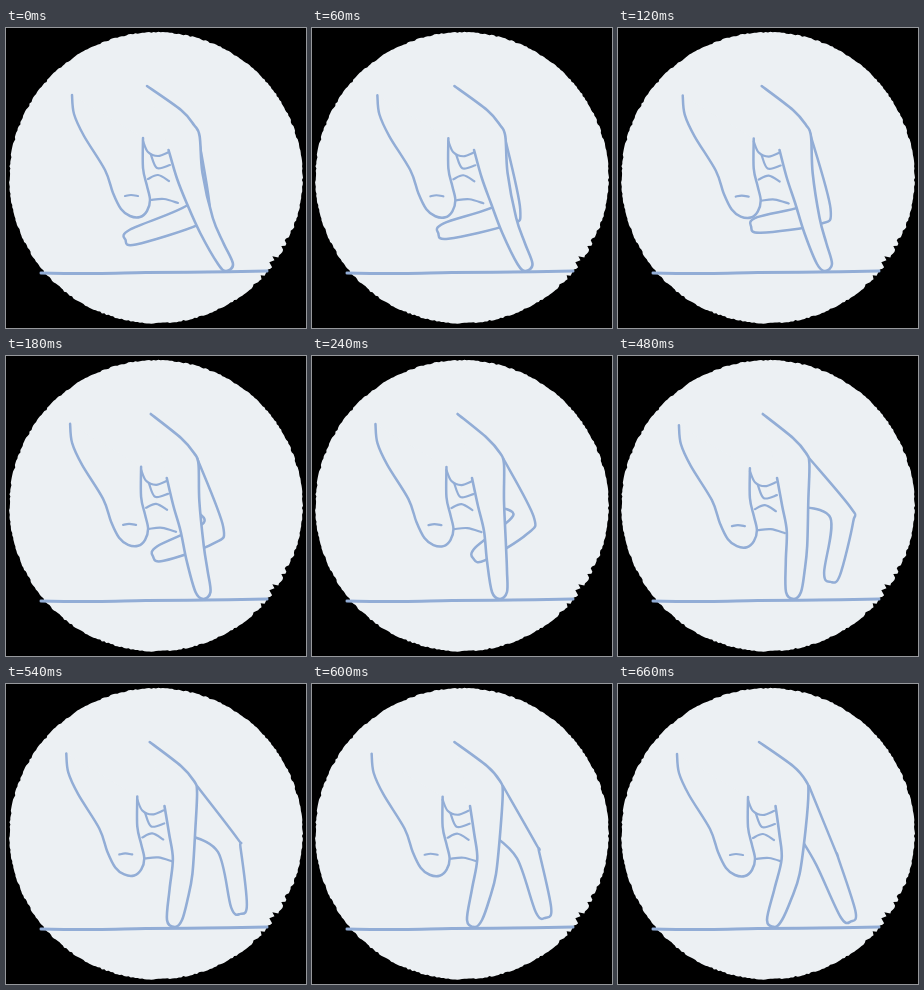
These frames come from a looping animation (300x300 px, 720 ms). An HTML page with a canvas:

```html
<!DOCTYPE html>
<html>
<head>
<meta charset="utf-8">
<style>
  html, body { margin: 0; width: 100%; height: 100%; overflow: hidden; background: #000; }
  canvas { display: block; }
</style>
</head>
<body>
<canvas id="stage" width="300" height="300"></canvas>
<script>
const ctx = document.getElementById('stage').getContext('2d');
const STEP = 60, STEPS = 12, PAPER = '#ecf0f3', INK = '#92add6';

// The thumb side and palm folds keep their shape and drift as a whole.
const thumb = [[66, 67], [68, 86], [78, 108], [99, 142], [107, 165], [115, 181], [124, 188],
  [134, 189], [141, 183], [144, 172], [141, 158], [137, 140], [137, 110]];
const folds = [
  [[137, 113], [142, 124], [152, 128], [163, 124]],
  [[145, 127], [151, 140], [164, 137]],
  [[142, 151], [152, 147], [163, 153]],
  [[145, 172], [158, 171], [172, 175]],
  [[119, 168], [125, 167], [132, 168]]
];

// Planted finger: x, y and how far each point follows the tip.
const planted = [[175, 82, 0], [188, 97, 0], [192, 108, 0.05], [192, 145, 0.14], [194, 190, 0.4], [195, 215, 0.7],
  [195, 236, 1], [188, 243, 1], [180, 236, 1], [175, 205, 0.6], [172, 175, 0.27], [166, 150, 0.15], [160, 122, 0.08]];

// Key positions of the moving joints: step, planted tip x, then knee and tip of the swinging finger.
const joints = [
  [0, 220, 192, 184, 127, 209],
  [2, 207, 201, 184, 141, 197],
  [4, 188, 211, 166, 168, 198],
  [6, 181, 221, 158, 205, 195],
  [8, 176, 224, 160, 214, 218],
  [9, 169, 222, 162, 233, 222],
  [11, 157, 207, 173, 230, 230]
];

function jointsAt(step) {
  const i = Math.max(1, joints.findIndex(j => j[0] >= step));
  const a = joints[i - 1], b = joints[i], k = (step - a[0]) / (b[0] - a[0]);
  return a.map((v, n) => v + (b[n] - v) * k).slice(1);
}

// Smooth curve through all points, optionally covering what lies behind it.
function curve(p, width, cover) {
  ctx.beginPath();
  ctx.moveTo(...p[0]);
  for (let i = 0; i < p.length - 1; i++) {
    const a = p[i - 1] || p[i], b = p[i], c = p[i + 1], d = p[i + 2] || c;
    ctx.bezierCurveTo(b[0] + (c[0] - a[0]) / 6, b[1] + (c[1] - a[1]) / 6,
      c[0] - (d[0] - b[0]) / 6, c[1] - (d[1] - b[1]) / 6, ...c);
  }
  if (cover) ctx.fill();
  ctx.lineWidth = width;
  ctx.stroke();
}

// Point at a joint, moved along and to the outside of the bone from a to b.
function beside(joint, a, b, along, out) {
  const dx = b[0] - a[0], dy = b[1] - a[1], len = Math.hypot(dx, dy);
  return [joint[0] + (dx * along + dy * out) / len, joint[1] + (dy * along - dx * out) / len];
}

function swingingFinger(knee, tip) {
  const root = [180, 108];
  const shin = (joint, along, out) => beside(joint, knee, tip, along, out);
  curve([[191, 102], beside(knee, root, knee, 0, 12), shin(knee, 4, 12), shin(tip, 0, 8), shin(tip, 8, 0),
    shin(tip, 0, -8), shin(knee, 4, -11), [180, 150]], 2.5, true);
}

// Paper disc with a slightly torn edge, roughest at the lower right.
function disc() {
  let seed = 7;
  const random = () => (seed = seed * 16807 % 2147483647) / 2147483647;
  ctx.beginPath();
  for (let i = 0; i < 400; i++) {
    const a = i / 400 * Math.PI * 2;
    const torn = 1.2 + 6 * Math.max(0, Math.cos(a - 0.6)) ** 60;
    const r = 147 - random() ** 2 * torn;
    ctx.lineTo(150 + r * Math.cos(a), 149.7 + (r - 1) * Math.sin(a));
  }
  ctx.fill();
}

function draw() {
  const step = Math.floor(performance.now() / STEP) % STEPS, p = step / (STEPS - 1);
  const [plantedX, kneeX, kneeY, tipX, tipY] = jointsAt(step);
  const drift = points => points.map(([x, y]) => [x - 7 * p, y + 3 * p]);

  ctx.clearRect(0, 0, 300, 300);
  ctx.fillStyle = PAPER;
  ctx.strokeStyle = INK;
  ctx.lineCap = ctx.lineJoin = 'round';
  disc();
  curve([[35, 245], [90, 245.5], [140, 244.5], [200, 244], [261, 243]], 3);
  swingingFinger([kneeX, kneeY], [tipX, tipY]);
  curve(drift(thumb), 2.5, true);
  folds.forEach(fold => curve(drift(fold), 2.2));
  const wrist = [141 + 5 * Math.sin(Math.PI * p), 58];
  curve([wrist, ...planted.map(([x, y, sway]) => [x + (plantedX - 188) * sway, y])], 2.6, true);
  requestAnimationFrame(draw);
}
draw();
</script>
</body>
</html>
```
